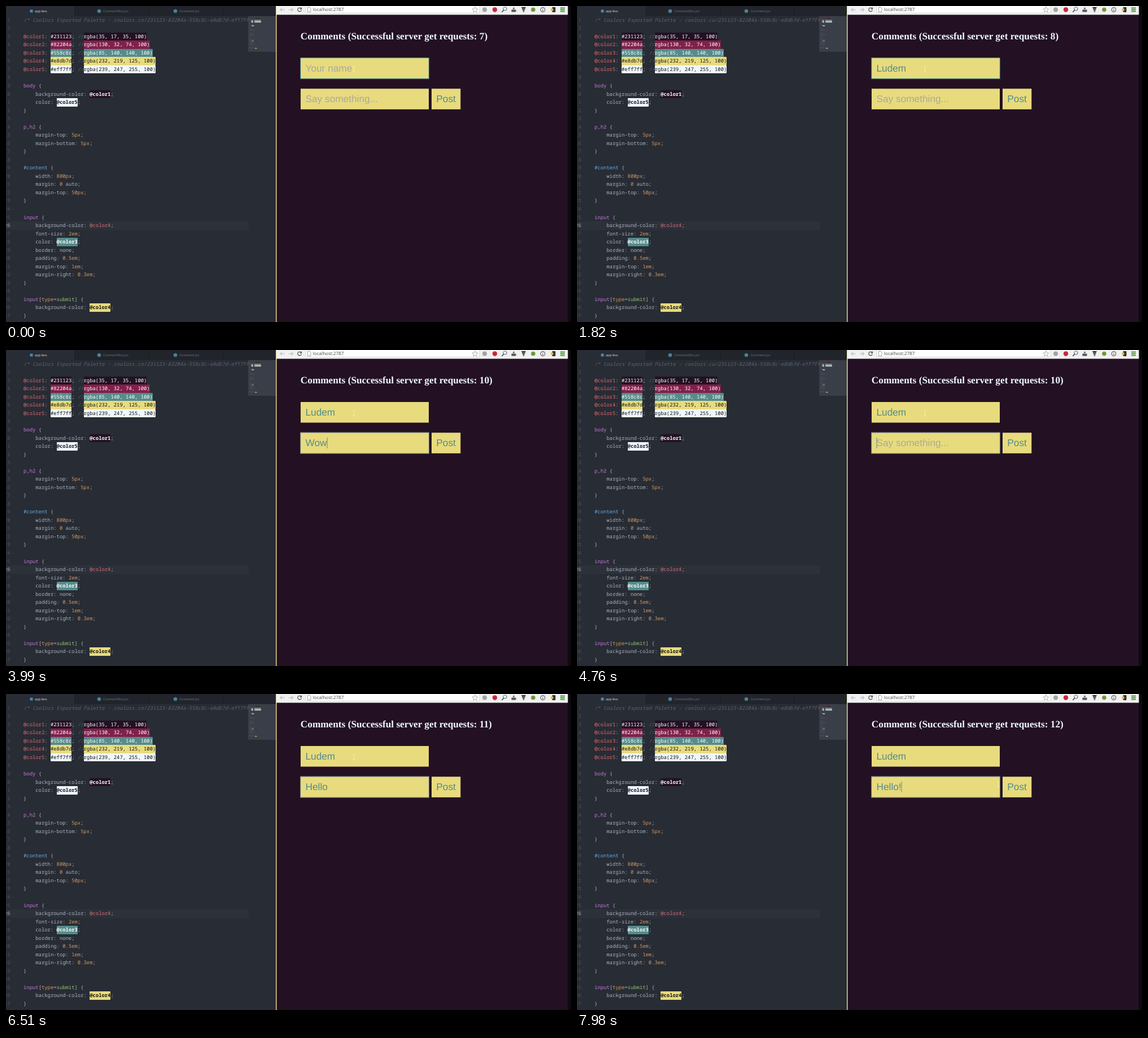
These frames come from a looping animation (1001x559 px, 8000 ms). An HTML page:

```html
<!DOCTYPE html>
<html lang="en">
<head>
<meta charset="utf-8">
<title>Comment form</title>
<style>
  html, body { margin: 0; width: 100%; height: 100%; overflow: hidden; background: #282c34; }
  body { position: relative; text-rendering: geometricPrecision; }
  svg { position: absolute; left: 0; top: 0; }
  .code {
    position: absolute; left: 0; top: 17.75px; width: 429.5px; height: 541.25px; margin: 0;
    overflow: hidden; counter-reset: row; color: #abb2bf;
    font: 8.89px/14.54px "Noto Sans Mono", monospace;
  }
  .code div { position: relative; height: 1lh; padding-left: 31px; white-space: pre; }
  .code div::before {
    counter-increment: row; content: counter(row);
    position: absolute; left: -20px; width: 27.5px; text-align: right; color: #4b5261;
  }
  .code .active { background: #2c313a; }
  .code .active::before { color: #abb2bf; }
  .map {
    left: 430px; top: 17.8px; width: 500px; height: 670px; line-height: 17.07px;
    transform: scale(.09375); transform-origin: 0 0; opacity: .85;
  }
  .map div { padding: 0; }
  .map div::before { content: none; }
  .map .active { background: none; }
  .note { color: #5c6370; font-style: italic; }
  .tag { color: #c678dd; }
  .id { color: #61afef; }
  .num { color: #d19a66; }
  .str { color: #98c379; }
  .var { color: #e06c75; }
  .chip { display: inline-block; vertical-align: top; border-radius: 1px; color: #fff; }
  .bold { font-weight: 600; }
  .c1 { background: #231123; }
  .c2 { background: #82204a; }
  .c3 { background: #558c8c; }
  .c4 { background: #e8db7d; color: #111; }
  .c5 { background: #eff7ff; color: #111; }
  .tab { font: 5.7px "Open Sans", sans-serif; fill: #6d7482; }
  .url { font: 8.1px "Open Sans", sans-serif; fill: #444; }
  .title { font: bold 17.25px "Liberation Serif", serif; fill: #eff7ff; }
  .field { font: 17.25px "Liberation Sans", sans-serif; fill: #558c8c; }
  .empty { fill: #a9a9a0; }
</style>
</head>
<body>
<svg width="1001" height="559" viewBox="0 0 1001 559">
  <!-- editor tabs -->
  <rect width="478" height="18" fill="#21252b"/>
  <rect width="122" height="18" fill="#282c34"/>
  <path d="M122 0V18M253.500 0V18M384.500 0V18" stroke="#191c21" stroke-width=".8"/>
  <rect x="42.500" y="6.500" width="5" height="5" fill="#4d87b5"/>
  <circle cx="165" cy="9" r="3.300" fill="#4b7f99"/>
  <circle cx="300" cy="9" r="3.300" fill="#4b7f99"/>
  <text class="tab" x="51" y="11" style="fill:#dfe2e8">app.less</text>
  <text class="tab" x="172" y="11">CommentBox.jsx</text>
  <text class="tab" x="307.500" y="11">Comment.jsx</text>
  <rect x="429" y="18" width="49" height="63" fill="#393e48"/>

  <!-- browser -->
  <rect x="478" width="523" height="559" fill="#0d0a10"/>
  <rect x="478" width="2" height="559" fill="#e4d98a"/>
  <rect x="479.500" y="15" width="515.500" height="544" fill="#231123"/>
  <rect x="479" width="516.500" height="15.500" fill="#f1f1f1"/>
  <rect x="531" y="-2" width="308" height="14.500" fill="#fff" stroke="#c9c9c9" stroke-width=".7"/>
  <g fill="none" stroke="#c6c6c6" stroke-width="1.500">
    <path d="M493.500 6.500H486M489 3.500L486 6.500L489 9.500M501 6.500H508.500M505.500 3.500L508.500 6.500L505.500 9.500"/>
    <path d="M522.600 4.300A3.300 3.300 0 1 0 523.300 7.300M523.500 2.500V5.300H520.700" stroke="#555" stroke-width="1.300"/>
    <path d="M534.500 2H538L540 4V10.500H534.500Z" stroke="#888" stroke-width=".8"/>
    <path d="M831 1.500L832.500 5L836 5.200L833.300 7.500L834.200 11L831 9L827.800 11L828.700 7.500L826 5.200L829.500 5Z" stroke="#999" stroke-width=".8"/>
    <circle cx="884" cy="5" r="3" stroke="#667f96" stroke-width="1.200"/>
    <path d="M881.800 7.200L878.500 10.800" stroke="#444" stroke-width="1.700"/>
    <circle cx="951" cy="6.500" r="4" stroke="#444" stroke-width="1"/>
    <path d="M951 4V5M951 6V9" stroke="#444" stroke-width="1"/>
    <path d="M982 3.500H990M982 6.500H990M982 9.500H990" stroke="#4f9a3c" stroke-width="1.800"/>
  </g>
  <circle cx="848" cy="6.500" r="4" fill="#a3a3a3"/>
  <circle cx="866" cy="6.500" r="4.200" fill="#c8283c"/>
  <path d="M895.500 6.500H903.500V10.500H895.500ZM897.500 5.500L899.500 2L901.500 5.500Z" fill="#555"/>
  <path d="M913 2H921L919.500 5H914.500ZM914 5.700H920L918.500 8H915.500ZM915.500 8.700H918.500L917 11.500Z" fill="#333"/>
  <circle cx="934" cy="6.500" r="3.800" fill="#6d9a3a"/>
  <rect x="967.500" y="2" width="6" height="9" rx="1" fill="#333"/>
  <rect x="965" y="4.500" width="4.500" height="4" fill="#e3c443"/>
  <text class="url" x="543.800" y="9.300">localhost:2787</text>

  <!-- page -->
  <text class="title" id="title" x="521.800" y="59"></text>
  <g fill="#e8db7d">
    <rect x="522" y="92" width="227" height="36.500"/>
    <rect x="522" y="146.300" width="227" height="36.500"/>
    <rect x="754" y="146.300" width="51.300" height="36.500"/>
  </g>
  <rect id="ring" x="521.800" width="227.400" height="37" fill="none" stroke-width=".9"/>
  <text class="field" id="name" x="530.500" y="116"></text>
  <text class="field" id="message" x="530.500" y="170.200"></text>
  <text class="field" x="762.300" y="170.200">Post</text>
  <rect id="caret" width="1" height="19" fill="#558c8c"/>
  <path id="mouse" d="M-2 -4.500Q0 -4.500 0 -3.500Q0 -4.500 2 -4.500M0 -3.500V3.500M-2 4.500Q0 4.500 0 3.500Q0 4.500 2 4.500" fill="none" stroke="#fff" stroke-opacity=".6" stroke-width=".8"/>
</svg>

<script>
const source = `/* Coolors Exported Palette - coolors.co/231123-82204a-558c8c-e8db7d-eff7ff */

@color1: #231123; //rgba(35, 17, 35, 100)
@color2: #82204a; //rgba(130, 32, 74, 100)
@color3: #558c8c; //rgba(85, 140, 140, 100)
@color4: #e8db7d; //rgba(232, 219, 125, 100)
@color5: #eff7ff; //rgba(239, 247, 255, 100)

body {
    background-color: @color1;
    color: @color5;
}

p,h2 {
    margin-top: 5px;
    margin-bottom: 5px;
}

#content {
    width: 800px;
    margin: 0 auto;
    margin-top: 50px;
}

input {
    background-color: @color4;
    font-size: 2em;
    color: @color3;
    border: none;
    padding: 0.5em;
    margin-top: 1em;
    margin-right: 0.3em;
}

input[type=submit] {
    background-color: @color4;
}`;

const ACTIVE = 25;
const $ = id => document.getElementById(id);
const span = (cls, text) => `<span class="${cls}">${text}</span>`;

function selector(line) {
  return line.replace(/#?\w+/g, w =>
    span(w === 'type' ? 'num' : w === 'submit' ? 'str' : w[0] === '#' ? 'id' : 'tag', w));
}

function declaration(line, row) {
  const token = /(#\w{6}|rgba\([^)]*\)|@color\d)|\d[\d.]*(?:px|em)?|\/\//g;
  return line.replace(token, (w, color, at) => {
    if (w === '//') return span('note', w);
    if (!color) return span('num', w);
    const isVar = w[0] === '@';
    if (isVar && (at === 0 || row === ACTIVE)) return span('var', w);
    return span(isVar ? `chip bold c${w.at(-1)}` : `chip c${row - 1}`, w);
  });
}

function highlight(line, row) {
  if (line.startsWith('/*')) return span('note', line);
  return line.endsWith('{') ? selector(line) : declaration(line, row);
}

const code = document.createElement('pre');
code.className = 'code';
code.innerHTML = source.split('\n').map((line, row) =>
  `<div${row === ACTIVE ? ' class="active"' : ''}>${highlight(line, row)}</div>`).join('');
const map = code.cloneNode(true);
map.classList.add('map');
document.body.append(code, map);

// Each track lists [start ms, value]
const LOOP = 8000, TICK = 70;
const requests = [[0, 7], [420, 8], [2170, 9], [3990, 10], [5740, 11], [7560, 12]];
const names = [[0, ''], [840, 'L'], [1120, 'Lu'], [1190, 'Lud'], [1260, 'Lude'], [1330, 'Ludem']];
const messages = [
  [0, ''], [2800, 'W'], [3010, 'Wo'], [3220, 'Wow'], [4480, 'Wo'], [4620, 'W'], [4760, ''],
  [5530, 'H'], [5670, 'He'], [5740, 'Hel'], [5880, 'Hell'], [6020, 'Hello'], [6720, 'Hello!']
];
const carets = [
  [0, 0], [350, 1], [1820, 0], [1890, 1], [2660, 0], [2800, 1], [3710, 0], [3990, 1],
  [5250, 0], [5530, 1], [6510, 0], [6720, 1], [7210, 0], [7700, 1]
];
const FOCUS_SWITCH = 1890, MOUSE_START = 7420;

const valueAt = (track, t) => track.findLast(([start]) => start <= t)[1];

function setField(el, value, placeholder) {
  el.textContent = value || placeholder;
  el.classList.toggle('empty', !value);
  return value ? el.getComputedTextLength() : 0;
}

function setAttrs(el, attrs) {
  for (const key in attrs) el.setAttribute(key, attrs[key]);
}

function draw(t) {
  $('title').textContent = `Comments (Successful server get requests: ${valueAt(requests, t)})`;
  const nameWidth = setField($('name'), valueAt(names, t), 'Your name');
  const messageWidth = setField($('message'), valueAt(messages, t), 'Say something...');

  const second = t >= FOCUS_SWITCH;
  setAttrs($('ring'), { y: second ? 146 : 91.8, stroke: second ? '#93a9ad' : '#4b9aa8' });
  setAttrs($('caret'), {
    x: 530.5 + (second ? messageWidth : nameWidth),
    y: second ? 155 : 100.8,
    opacity: valueAt(carets, t)
  });

  const steps = Math.max(0, Math.floor((t - MOUSE_START) / TICK) + 1);
  const p = Math.min(1, steps / 9);
  const ease = p * p * (3 - 2 * p);
  setAttrs($('mouse'), { transform: `translate(${616.3 + 130 * ease} ${112.3 + 47.5 * ease})` });
}

const begin = performance.now();
function loop() {
  draw((performance.now() - begin) % LOOP);
  requestAnimationFrame(loop);
}
loop();
</script>
</body>
</html>
```
